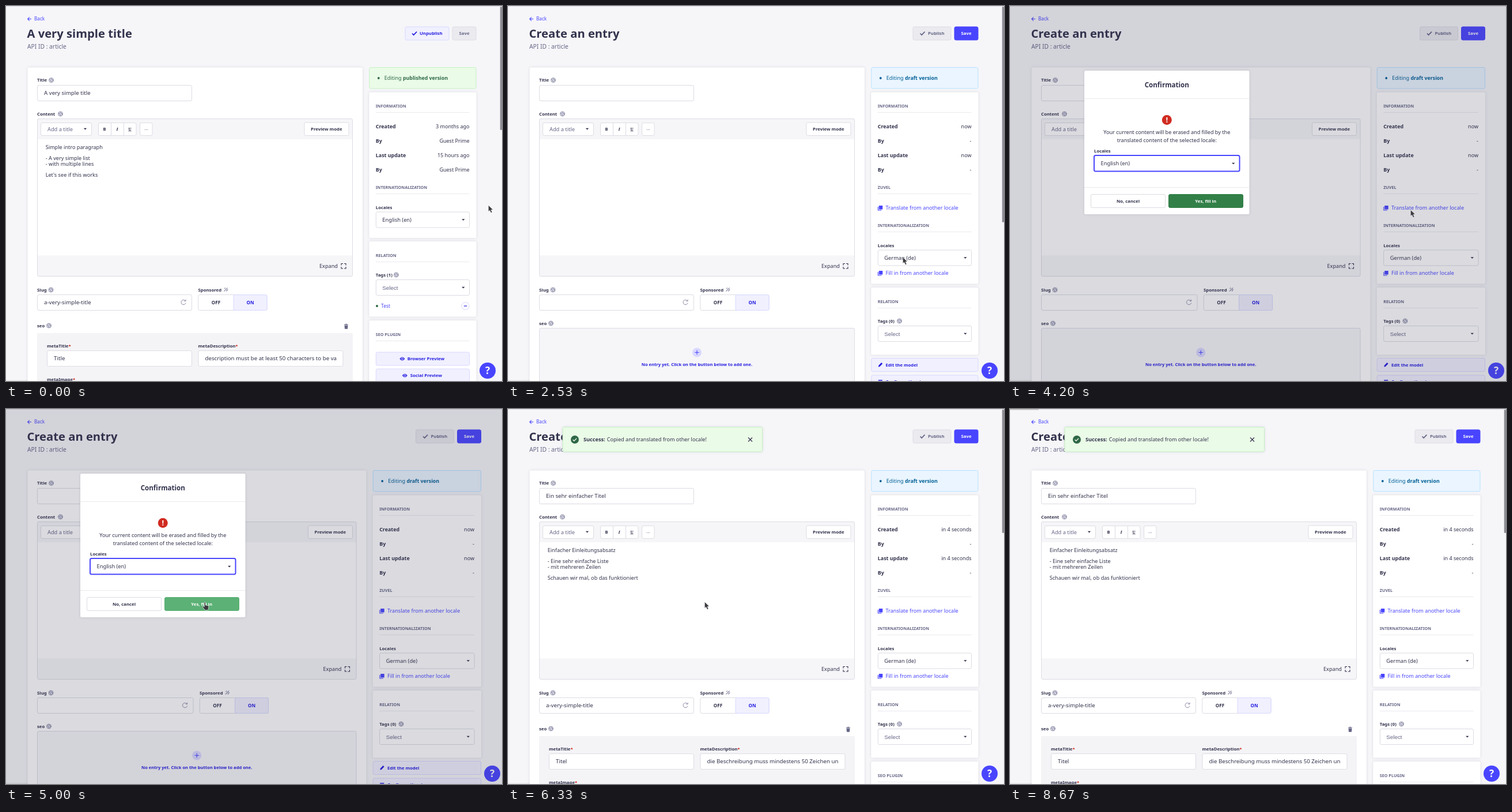
An HTML page that plays this animation: 861x650 px, repeating every 8.79 s.

```html
<!DOCTYPE html>
<html lang="en">
<head>
<meta charset="utf-8">
<title>Translate an entry</title>
<style>
  html, body { margin: 0; width: 100%; height: 100%; overflow: hidden; background: #f6f6f9; }
  svg { display: block; font-family: "Noto Sans", sans-serif; }
  .card { filter: drop-shadow(0 .7px 2px rgba(33, 33, 52, .13)); }
  .pop { filter: drop-shadow(0 1.5px 6px rgba(33, 33, 52, .18)); }
  .arial { font-family: "Liberation Sans", Arial, sans-serif; }
  .serif { font-family: "Noto Serif", serif; }
</style>
</head>
<body>
<svg width="861" height="650" viewBox="0 0 861 650">
  <g id="page"></g>
  <g id="cursor" stroke="#fff" stroke-width=".6" fill="#3a3a3f">
    <path id="arrow" d="M.3.3V11.2L2.7 9.2 4.9 13.6 7 12.6 5 8.4 8.3 8Z"/>
    <path id="hand" d="M3.2 1.2Q4.4-.2 5.4 1.2V6L9.2 6.7Q11 7.2 10.8 9.2L9.8 14.6H4.6L.4 9.4Q0 7.4 1.9 8L3.4 9Z"/>
  </g>
</svg>
<script>
const LOOP = 8790, TICK = 200 / 3;
const INK = '#32324d', MUTED = '#666687', GRAY = '#8e8ea9', LINE = '#dcdce4', SOFT = '#eaeaef',
  BG = '#f6f6f9', BLUE = '#4945ff', DEEP = '#271fe0', PALE = '#f0f0ff', LILAC = '#d9d8ff',
  GREEN = '#2f6846', RED = '#d02b20';

const rect = (x, y, x2, y2, fill = '#fff', stroke = 'none', r = 2.5, extra = '') =>
  `<rect x="${x}" y="${y}" width="${x2 - x}" height="${y2 - y}" rx="${r}" fill="${fill}" stroke="${stroke}" ${extra}/>`;
const path = (d, stroke, width = 1, fill = 'none') =>
  `<path d="${d}" stroke="${stroke}" stroke-width="${width}" fill="${fill}"/>`;
const circle = (x, y, r, fill, stroke = 'none') =>
  `<circle cx="${x}" cy="${y}" r="${r}" fill="${fill}" stroke="${stroke}"/>`;
// y is the middle of the capitals
const text = (x, y, str, size, fill = INK, weight = 400, anchor = 'start', extra = '') =>
  `<text x="${x}" y="${y + size * .36}" font-size="${size}" fill="${fill}" font-weight="${weight}" text-anchor="${anchor}" ${extra}>${str}</text>`;

const label = (x, y, str) => text(x, y, str, 7.75, INK, 700);
const required = (x, y, str) => label(x, y, `${str}<tspan fill="${RED}">*</tspan>`);
const caption = (x, y, str, fill, anchor = 'middle') => text(x, y, str, 7.75, fill, 700, anchor);
const card = (x, y, x2, y2) => rect(x, y, x2, y2, '#fff', 'none', 2.5, 'class="card"');
const caret = (x, y) => path(`M${x - 2.7} ${y - 1.3}h5.4l-2.7 2.9z`, 'none', 0, INK);
const check = (x, y, color, s = 1) =>
  path(`M${x} ${y}l${2.6 * s} ${2.7 * s}l${5.4 * s} ${-5.6 * s}`, color, 1.7 * s);
const globe = (x, y) => circle(x, y, 3.9, '#e4e4ec', GRAY) +
  path(`M${x - 3} ${y - 1.5}l2 1.8l1.5 2.8M${x - .5} ${y - 3}l1.5 2l2.4 .8l-1.2 2`, GRAY, 1.2);
const input = (x, y, x2, str) => rect(x, y, x2, y + 27, '#fff', LINE) + text(x + 11.5, y + 13.5, str, 9.7);
const copyIcon = (x, y) => rect(x + 2, y - 4, x + 8.5, y + 2.5, BLUE, 'none', .5) +
  path(`M${x + .6} ${y - 2}v6h6`, BLUE, 1.1);
const link = (x, y, str) => copyIcon(x, y) + text(x + 13.7, y, str, 9.13, BLUE);
const eye = (x, y) => path(`M${x - 4.5} ${y}q4.5-6 9 0q-4.5 6-9 0z`, 'none', 0, DEEP) +
  circle(x, y, 1.7, DEEP, PALE);

const ENGLISH = {
  title: 'A very simple title',
  body: ['Simple intro paragraph', '- A very simple list', '- with multiple lines', "Let's see if this works"],
  slug: 'a-very-simple-title', metaTitle: 'Title',
  meta: 'description must be at least 50 characters to be va',
  when: ['3 months ago', '15 hours ago'], by: 'Guest Prime'
};
const EMPTY = { title: '', body: [], slug: '', when: ['now', 'now'], by: '-' };
const GERMAN = {
  title: 'Ein sehr einfacher Titel',
  body: ['Einfacher Einleitungsabsatz', '- Eine sehr einfache Liste', '- mit mehreren Zeilen', 'Schauen wir mal, ob das funktioniert'],
  slug: 'a-very-simple-title', metaTitle: 'Titel',
  meta: 'die Beschreibung muss mindestens 50 Zeichen un',
  when: ['in 4 seconds', 'in 4 seconds'], by: '-'
};

const help = x => circle(x, 632, 14, BLUE) + text(x, 632, '?', 17, '#fff', 700, 'middle');

function header(data, E) {
  const live = data === ENGLISH;
  let s = path('M44 22.5h-6.3M40.8 19.3l-3.2 3.2l3.2 3.2', BLUE, 1.1) + text(49, 22.5, 'Back', 8.2, BLUE) +
    text(36.5, 48, live ? data.title : 'Create an entry', 20.2, INK, 700) +
    text(37, 70, 'API ID : article', 10.3, MUTED);
  if (live) s += rect(E - 123.5, 36, E - 47.5, 59, PALE, LILAC) + check(E - 111.5, 47.5, DEEP) +
    caption(E - 59, 47.5, 'Unpublish', DEEP, 'end');
  else s += rect(E - 113.5, 36, E - 47.5, 59, SOFT, LINE) + check(E - 101, 47.5, MUTED) +
    caption(E - 59, 47.5, 'Publish', MUTED, 'end');
  return s + rect(E - 41.5, 36, E - .5, 59, live ? SOFT : BLUE, live ? LINE : BLUE) +
    caption(E - 21, 47.5, 'Save', live ? MUTED : '#fff');
}

function form(data, R, half) {
  const right = R - 17.5, col = half + 11, mid = (54.5 + right) / 2;
  let s = card(37.5, 106.5, R, 670) +
    label(54, 128.5, 'Title') + globe(78.5, 128.5) + input(54.5, 137.5, half, data.title) +
    label(54, 187, 'Content') + globe(94.5, 187) +
    rect(54.5, 195.5, right, 468.5, BG, LINE) + rect(55, 231, right - .5, 432.5, '#fff', 'none', 0) +
    rect(60.5, 202.5, 148.5, 224.5, '#fff', LINE) + text(72, 213.5, 'Add a title', 9.25, MUTED) + caret(137.5, 213) +
    rect(160.5, 202.5, 226, 224.5, '#fff', LINE) + path('M182.5 203v21M204.5 203v21', LINE) +
    text(171, 213.5, 'B', 7.5, INK, 700, 'middle') +
    text(193, 213.5, 'I', 7.5, INK, 600, 'middle', 'class="serif" font-style="italic"') +
    text(215, 213, 'U', 7, INK, 600, 'middle', 'class="serif" text-decoration="underline"') +
    rect(232.5, 202.5, 254, 224.5, '#fff', LINE) + text(243.3, 212, '...', 8, MUTED, 400, 'middle') +
    rect(R - 101, 202, R - 24, 224.5, '#fff', LINE) + caption(R - 62.7, 213.5, 'Preview mode', INK) +
    text(R - 75, 451, 'Expand', 9.15) +
    path(`M${R - 37} 449.5v-3h3M${R - 32} 446.5h3v3M${R - 29} 452v3h-3M${R - 34} 455h-3v-3`, INK, 1.1);
  data.body.forEach((row, i) => s += text(68.7, [244.5, 264, 273.7, 293][i], row, 9.15));
  s += label(54, 492, 'Slug') + globe(78, 492) + input(54.5, 500.5, half, data.slug) +
    path(`M${half - 11} 511.2a4.1 4.1 0 1 0 .6 3.4M${half - 10.4} 508.8v2.7h-2.8`, GRAY, 1) +
    label(col, 492, 'Sponsored') +
    path(`M${col + 45} 494.5l6-6M${col + 45.5} 490l2-1.5M${col + 49} 494.5l2.5-3.5`, GRAY, 1.3) +
    rect(col + .3, 500.5, col + 119.5, 527.5, '#fff', LINE) +
    rect(col + 61.5, 500.5, col + 119.5, 527.5, PALE, LILAC) +
    text(col + 31, 513.7, 'OFF', 8.1, INK, 700, 'middle') + text(col + 90.5, 513.7, 'ON', 8.1, DEEP, 700, 'middle');
  if (data === EMPTY) return s + label(54, 550, 'seo') + globe(74.5, 550) +
    rect(54.5, 558.5, right, 670, BG, LINE) + circle(mid, 600.5, 8, LILAC) +
    path(`M${mid - 3.7} 600.5h7.4M${mid} 596.8v7.4`, BLUE, 1.1) +
    text(mid, 621.5, 'No entry yet. Click on the button below to add one.', 7.57, DEEP, 700, 'middle');
  return s + label(54, 554, 'seo') + globe(74.5, 554) +
    path('M587 552.2h7M589.4 551.4h2.2', MUTED, 1.1) + path('M587.5 553.5h6l-.5 6.2h-5z', 'none', 0, MUTED) +
    rect(54, 567, right + .5, 670, '#f4f4f7', 'none', 0) +
    required(71, 589, 'metaTitle') + input(71.5, 597.5, half, data.metaTitle) +
    required(col, 589, 'metaDescription') + input(col + .5, 597.5, right - 16.5, data.meta) +
    required(71, 647.5, 'metaImage');
}

function aside(data, X, E) {
  const live = data === ENGLISH, x = X + 11.5, e = E - 12, o = live ? 0 : 66, q = live ? 0 : 80;
  const [tint, edge, tone] = live ? ['#eafbe7', '#c6f0c2', GREEN] : ['#eaf5ff', '#b8e1ff', '#006096'];
  const section = (y, str) => text(x, y, str, 7.2, MUTED, 700) + path(`M${x} ${y + 11.5}H${e}`, SOFT);
  const select = (y, str, cls = '') => rect(x + .5, y, e, y + 27, '#fff', LINE) +
    text(x + 11.5, y + 13.5, str, cls ? 9.8 : 9.3, cls ? MUTED : INK, 400, 'start', cls) + caret(e - 10.7, y + 13.5);
  const button = (y, str) => rect(x + .5, y, e, y + 23, PALE, LILAC) + eye(x + (str[0] === 'B' ? 46 : 50.5), y + 11.5) +
    caption(x + (str[0] === 'B' ? 55 : 60), y + 11.5, str, DEEP, 'start');
  let s = rect(X + .5, 106.5, E - .5, 143, tint, edge) + circle(x + 5, 125, 1.9, tone) +
    text(x + 15, 125, `Editing <tspan font-weight="700" font-size="8.8">${live ? 'published' : 'draft'} version</tspan>`, 9.1, tone) +
    card(X, 149.5, E, live ? 402 : 481.5) + section(173, 'INFORMATION');
  ['Created', 'By', 'Last update', 'By'].forEach((name, i) => {
    const y = 209 + 25 * i;
    s += text(x, y, name, 8.9, INK, 700) + text(e, y, i % 2 ? data.by : data.when[i / 2], 9, INK, 400, 'end');
  });
  if (!live) s += section(314, 'ZUVEL') + link(x, 350, 'Translate from another locale') +
    link(x, 463, 'Fill in from another locale');
  s += section(314 + o, 'INTERNATIONALIZATION') + label(x, 349 + o, 'Locales') +
    select(357 + o, live ? 'English (en)' : 'German (de)') +
    card(X, 408 + q, E, live ? 538.5 : 604.5) + section(432 + q, 'RELATION') +
    label(x, 466 + q, `Tags (${live ? 1 : 0})`) + globe(x + (live ? 35.5 : 37.7), 466 + q) +
    select(474.5 + q, 'Select', 'class="arial"');
  if (live) s += circle(x + 2.2, 520, 2, GREEN) + text(x + 9.3, 520, 'Test', 8.4, BLUE) +
    circle(e - 7, 520, 6.5, '#fff', LILAC) + path(`M${e - 9.7} 520h5.4`, DEEP, 1.2);
  if (data === EMPTY) return s + rect(X + .5, 610.5, E - .5, 633.5, PALE, LILAC) +
    path(`M${x + 1} 625.5l.6-2.6l4.8-4.8l2 2l-4.8 4.8z`, 'none', 0, DEEP) +
    text(x + 13.7, 622, 'Edit the model', 7.65, DEEP, 700) +
    rect(X + .5, 640, E - .5, 663, PALE, LILAC) + path(`M${x + 1} 648.7h7`, DEEP, 1.4) +
    text(x + 13.7, 651, 'Configure the view', 7.65, DEEP, 700);
  s += card(X, 545 + o, E, 680) + section(569 + o, 'SEO PLUGIN');
  return live ? s + button(600, 'Browser Preview') + button(629, 'Social Preview') : s;
}

const menu = () => rect(642.5, 388, 804.5, 447, '#fff', SOFT, 2.5, 'class="pop"') +
  circle(658.7, 403.5, 2.1, GREEN) + text(666, 403.5, 'English (en)', 8.95, BLUE, 700) +
  circle(658.7, 431.3, 1.7, '#fff', GRAY) + text(666, 431.3, 'German (de)', 9.25);

function dialog(stage, angle) {
  const focus = stage < 3, busy = stage === 4;
  const fill = busy ? SOFT : stage === 2 ? '#5cb176' : '#328048';
  let s = rect(0, 0, 861, 650, INK, 'none', 0, 'opacity=".18"') +
    rect(129, 112, 415.5, 361, '#fff', 'none', 2.5, 'class="card"') +
    text(272.3, 137, 'Confirmation', 11.6, INK, 700, 'middle') + path('M129 160.5H415.5M129 314.5H415.5', SOFT) +
    circle(272.3, 197.5, 8.5, RED) + text(272.3, 197.5, '!', 13, '#fff', 700, 'middle') +
    text(272.3, 218.5, 'Your current content will be erased and filled by the', 9.1, INK, 400, 'middle') +
    text(272.3, 232.3, 'translated content of the selected locale:', 9.1, INK, 400, 'middle') +
    label(146, 251, 'Locales') +
    rect(146, 259, 398.5, 286.5, '#fff', focus ? BLUE : LINE, 2.5, focus ? 'stroke-width="2"' : '') +
    text(157.5, 273, 'English (en)', 9.3) + caret(387.7, 273) +
    rect(140.5, 326.5, 269.5, 349.5, '#fff', LINE) + caption(205, 338.3, 'No, cancel', INK) +
    rect(275.5, 326.5, 404.5, 349.5, fill, busy ? LINE : fill) +
    caption(busy ? 346.7 : 339.7, 338.3, 'Yes, fill in', busy ? MUTED : '#fff');
  if (busy) s += `<circle cx="318" cy="338" r="3.2" fill="none" stroke="${GRAY}" stroke-width="1.2" stroke-dasharray="17 3" transform="rotate(${angle} 318 338)"/>`;
  return s;
}

const toast = () => rect(95, 31.5, 441.5, 74, '#eafbe7', '#c6f0c2', 2.5, 'class="card"') +
  circle(116, 53, 7, GREEN) + check(112.7, 53.2, '#fff', .8) +
  text(131, 53, 'Success:', 9.2, INK, 700) + text(171.7, 53, 'Copied and translated from other locale!', 9.15) +
  path('M417 49.5l7 7M424 49.5l-7 7', INK, 1.2);

function scene(t, angle) {
  const edges = rect(0, 0, 861, 1, LINE, 'none', 0) + rect(0, 648, 172, 650, '#000', 'none', 0, 'opacity=".05"');
  const base = rect(0, 0, 861, 650, BG, 'none', 0);
  if (t >= 2200 && t < 2530) return base + edges + help(844) +
    `<circle cx="430" cy="330" r="19" fill="none" stroke="${BLUE}" stroke-width="4" stroke-dasharray="85 35"/>`;
  const data = t < 2200 ? ENGLISH : t < 6330 ? EMPTY : GERMAN;
  const modal = t >= 4200 && t < 6330;
  const [R, half, X, E] = modal ? [625.5, 325, 636.7, 825] : [619, 322.5, 630.3, 816.5];
  let s = base + edges + header(data, E) + form(data, R, half) + aside(data, X, E);
  if (t >= 1130 && t < 2200) s += menu();
  if (!modal) s += rect(857.7, 1, 861, data === EMPTY ? 375 : 215, '#8d8d95', 'none', 1.6);
  s += help(modal ? 844 : 836);
  if (modal) s += dialog(t < 4930 ? 1 : t < 5330 ? 2 : t < 5400 ? 3 : 4, angle);
  if (data === GERMAN) s += toast();
  if (t >= 8600) s += rect(0, 0, 50, 2, '#000', 'none', 1, 'opacity=".15"');
  return s;
}

// time, x, y of the pointer's corner
const MOVES = [[0, 837, 345], [267, 837, 345], [600, 685, 383], [733, 685, 383], [867, 698, 375], [1467, 698, 375],
  [1667, 688, 413], [1800, 688, 413], [1867, 681, 427], [2133, 681, 427], [2200, 685, 435], [3200, 685, 435],
  [3733, 695, 353], [4467, 695, 353], [4733, 480, 279], [5000, 341, 334], [7800, 341, 334], [8600, 3, 1],
  [8666, -40, -40], [LOOP, -40, -40]];

function pointer(t) {
  const i = MOVES.findIndex(m => m[0] > t);
  const [a, x, y] = MOVES[i - 1], [b, x2, y2] = MOVES[i], k = (t - a) / (b - a);
  return [x + (x2 - x) * k, y + (y2 - y) * k];
}

const get = id => document.getElementById(id);
const CUTS = [1130, 2200, 2530, 4200, 4930, 5330, 5400, 6330, 8600];
let shown;
function frame() {
  const t = performance.now() % LOOP, step = Math.floor((t + 4) / TICK) * TICK;
  const angle = Math.round((Math.min(Math.max(step, 5600), 5867) - 5600) * .6);
  const key = CUTS.filter(c => c <= t).length + ':' + angle;
  if (key !== shown) get('page').innerHTML = scene(t, angle);
  shown = key;
  const hand = t >= 595 && t < 2200 || t >= 4930 && t < 5330;
  get('hand').style.display = hand ? '' : 'none';
  get('arrow').style.display = hand ? 'none' : '';
  get('cursor').setAttribute('transform', `translate(${pointer(step)})`);
  requestAnimationFrame(frame);
}
frame();
</script>
</body>
</html>
```
